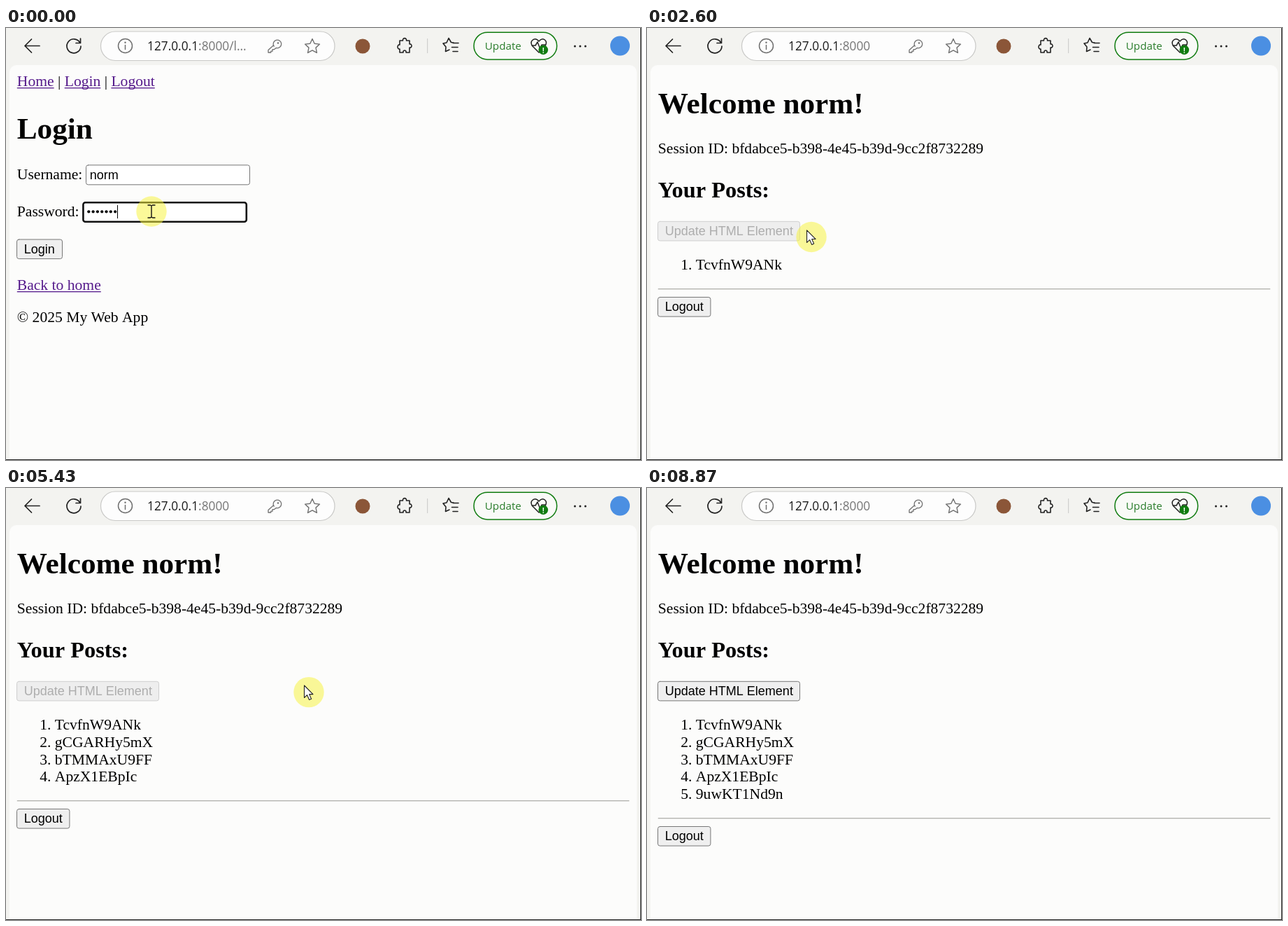
An HTML page with a canvas that plays this animation: 908 px wide and 617 px high, repeating every 8.9 s.

```html
<!DOCTYPE html>
<html lang="en">
<head>
<meta charset="utf-8">
<title>Login session demo</title>
<style>
html, body { margin: 0; width: 100%; height: 100%; overflow: hidden; background: #f3f3f0; }
canvas { display: block; width: 908px; height: 617px; }
</style>
</head>
<body>
<canvas id="stage" width="908" height="617"></canvas>
<script>
const W = 908, H = 617, LOOP = 8900;
const stage = document.getElementById('stage').getContext('2d');
const layer = document.createElement('canvas');
layer.width = W;
layer.height = H;
const off = layer.getContext('2d');
let c = stage;

const SERIF = '"Liberation Serif", "Times New Roman", serif';
const SANS = '"Liberation Sans", Arial, sans-serif';
const UI = '"Open Sans", "Noto Sans", sans-serif';
const BODY = '21.6px ' + SERIF;
const CONTROL = '18px ' + SANS;
const USER = 'norm';
const POSTS = ['TcvfnW9ANk', 'gCGARHy5mX', 'bTMMAxU9FF', 'ApzX1EBpIc', '9uwKT1Nd9n'];

// Moments of the story, in ms
const NAV = 340, CLICK = 2190, DISABLE = 2270, FIRST_POST = 2290, POST_GAP = 985, ENABLE = 7230;
const FADE = 165;

// Cursor stops: time, x, y of the tip
const PATH = [
  [1790, 208, 262], [2040, 196, 290], [2540, 196, 290], [2800, 426, 282],
  [6160, 426, 282], [6295, 406, 500], [7060, 406, 500], [7300, 422, 645]
];

const clamp = v => Math.max(0, Math.min(1, v));
const ease = v => v * v * (3 - 2 * v);

function text(str, x, y, font = BODY, color = '#000') {
  c.font = font;
  c.fillStyle = color;
  c.fillText(str, x, y);
  return c.measureText(str).width;
}

function box(x, y, w, h, r, fill, stroke, lw = 1) {
  c.beginPath();
  c.roundRect(x, y, w, h, r);
  if (fill) { c.fillStyle = fill; c.fill(); }
  if (stroke) { c.strokeStyle = stroke; c.lineWidth = lw; c.stroke(); }
}

function disc(x, y, r, fill) {
  c.beginPath();
  c.arc(x, y, r, 0, 7);
  c.fillStyle = fill;
  c.fill();
}

function line(path, color, lw) {
  c.strokeStyle = color;
  c.lineWidth = lw;
  c.lineJoin = c.lineCap = 'round';
  c.stroke(new Path2D(path));
}

function link(str, x, y) {
  const w = text(str, x, y, BODY, '#551a8b');
  c.fillRect(x, y + 2, w, 1.3);
  return x + w;
}

function button(label, y, w, mode) {
  const off = mode === 'disabled', hover = mode === 'hover';
  box(15.5, y + .5, w, 27.6, 3,
    hover ? '#e4e4e4' : off ? '#eeeeee' : '#efefef',
    off ? '#cfcfcf' : hover ? '#5a5a5a' : '#777');
  text(label, 25.8, y + 20, CONTROL, off ? '#adadad' : '#000');
}

function star(x, y, r) {
  let d = '';
  for (let i = 0; i < 10; i++) {
    const a = i * Math.PI / 5 - Math.PI / 2, k = i % 2 ? r * .48 : r;
    d += (i ? 'L' : 'M') + (x + k * Math.cos(a)) + ' ' + (y + k * Math.sin(a));
  }
  return d + 'Z';
}

function toolbar(path) {
  const ink = '#222', grey = '#707070', green = '#107c10';
  line('M48 25.5H27M36.5 16L27 25.5L36.5 35', ink, 1.7);
  line('M105.5 20.5A10 10 0 1 0 107 26M106.5 15V21.5H100', ink, 1.7);

  box(135.5, 5, 334.5, 41.5, 20.7, '#fdfdfd', '#c9c9c7', 1.2);
  line('M180.5 25.5A10 10 0 1 1 160.5 25.5A10 10 0 1 1 180.5 25.5M170.5 24.5V30.5', grey, 1.5);
  disc(170.5, 20.8, 1.2, grey);
  const w = text('127.0.0.1', 202, 32, '17.3px ' + UI, '#1b1b1b');
  text(path, 202 + w, 32, '17.3px ' + UI, '#767676');
  line('M383.2 26.2A5.8 5.8 0 1 1 386.2 28.4L383.6 30.6H381V33.2H378.8V35H375V31.6L382.8 24.6', grey, 1.3);
  disc(389, 21.5, 1.2, grey);
  line(star(438, 26.5, 11), grey, 1.4);

  disc(510, 26, 10.5, '#8b5638');
  line('M563 18H567.5C566.5 13.5 573.5 13.5 572.5 18H577V23C581 22 581 29 577 28V35H572C573 31 567 31 568 35H563V30C559 31 559 23 563 24Z', ink, 1.6);
  c.fillStyle = '#cfcfcd';
  c.fillRect(602, 15, 1.2, 21);
  line('M640 21L636.5 20.5L633 14.5L630 21L625 22L629 27L628.5 33.5L634 31M639 21.5H647M637.5 27.5H646M639 33.5H646', ink, 1.6);

  box(669, 6.2, 118.7, 38.8, 19.4, '#f9faf7', green, 1.5);
  text('Update', 684.8, 31, '15.2px ' + UI, '#2a7d2c');
  line('M762 19C757 12.5 748.5 17 752 25L762 35L771.5 25C775 17 767 12.5 762 19M752 25H757L760 20L763.5 29L766 24H771', ink, 1.5);
  disc(768.3, 31.3, 6.8, green);
  text('!', 766.5, 35.5, 'bold 11px ' + SANS, '#fff');
  for (const x of [813.5, 821, 828.5]) disc(x, 26, 1.5, ink);
  disc(878, 25.5, 14, '#4b8fe2');
}

function shell(path) {
  c.fillStyle = '#f3f3f0';
  c.fillRect(0, 0, W, H);
  toolbar(path);
  box(5, 53, 897, 575, 10, '#fcfcfb');
  c.fillStyle = '#222';
  c.fillRect(907, 0, 1, H);
  c.fillRect(0, 616, W, 1);
}

function loginPage() {
  shell(':8000/l...');
  let x = link('Home', 15.8, 83);
  x += text(' | ', x, 83);
  x = link('Login', x, 83);
  x += text(' | ', x, 83);
  link('Logout', x, 83);
  text('Login', 15.8, 158, 'bold 43.2px ' + SERIF);
  text('Username:', 15.8, 216);
  box(114.5, 195.8, 234, 28, 3, '#fff', '#777');
  text(USER, 119.8, 216, CONTROL);
  text('Password:', 15.8, 269);
  box(110.4, 249.2, 233.4, 27.6, 3, '#fff', '#101010', 2.6);
  for (let i = 0; i < 7; i++) disc(118.3 + 6.3 * i, 262.3, 2.1, '#000');
  c.fillStyle = '#000';
  c.fillRect(159, 253, 1, 19);
  button('Login', 301.5, 65);
  link('Back to home', 15.8, 374);
  text('© 2025 My Web App', 15.8, 420);
}

function homePage(count, mode) {
  shell(':8000');
  text('Welcome ' + USER + '!', 15.8, 122, 'bold 43.2px ' + SERIF);
  text('Session ID: bfdabce5-b398-4e45-b39d-9cc2f8732289', 15.8, 179);
  text('Your Posts:', 15.8, 242, 'bold 32.4px ' + SERIF);
  button('Update HTML Element', 275.8, 203, mode);
  for (let i = 0; i < count; i++) {
    const y = Math.round(345 + 24.75 * i);
    text(i + 1 + '.', 48.2, y);
    text(POSTS[i], 69.8, y);
  }
  const drop = count ? 46.5 + 24.75 * (count - 1) : 0;
  c.fillStyle = '#b4b4b0';
  c.fillRect(15.8, Math.round(325.2 + drop), 875.4, 1.4);
  button('Logout', Math.round(337.5 + drop), 75.4);
}

// Every page state with the time at which it fades in
const scenes = [
  [-FADE, loginPage],
  [NAV, () => homePage(0)],
  [1900, () => homePage(0, 'hover')],
  ...POSTS.map((_, i) => [FIRST_POST + POST_GAP * i, () => homePage(i + 1, 'disabled')]),
  [ENABLE, () => homePage(POSTS.length)]
];

function pointer(t) {
  let i = 0;
  while (i < PATH.length - 1 && t >= PATH[i + 1][0]) i++;
  const a = PATH[i], b = PATH[Math.min(i + 1, PATH.length - 1)];
  const k = b === a ? 0 : ease(clamp((t - a[0]) / (b[0] - a[0])));
  return [a[1] + (b[1] - a[1]) * k, a[2] + (b[2] - a[2]) * k];
}

function cursor(t) {
  const [x, y] = pointer(t);
  const beam = t < NAV + FADE / 2;
  disc(beam ? x : x + 7, beam ? y : y + 9.6, 21.7, 'rgba(248,244,60,.52)');
  if (t >= CLICK && t < CLICK + 130) {
    c.beginPath();
    c.arc(x, y, 7, 0, 7);
    c.strokeStyle = 'rgba(205,155,20,.8)';
    c.lineWidth = 3;
    c.stroke();
  }
  c.save();
  c.translate(x, y);
  if (beam) {
    line('M-5 -9H-1.5L0 -8L1.5 -9H5M0 -8V8M-5 9H-1.5L0 8L1.5 9H5', '#111', 1.4);
  } else {
    const arrow = new Path2D('M.5 0V17.5L4.6 13.7L7.6 20.5L10.6 19.2L7.7 12.6H13Z');
    c.fillStyle = '#fff';
    c.fill(arrow);
    c.strokeStyle = '#222';
    c.lineWidth = 1.1;
    c.stroke(arrow);
  }
  c.restore();
}

function draw(t) {
  let i = scenes.length - 1;
  while (scenes[i][0] > t) i--;
  const k = clamp((t - scenes[i][0]) / FADE);
  c = stage;
  if (k < 1) {
    scenes[i - 1][1]();
    c = off;
    scenes[i][1]();
    c = stage;
    c.globalAlpha = k;
    c.drawImage(layer, 0, 0);
    c.globalAlpha = 1;
  } else {
    scenes[i][1]();
  }
  if (t >= DISABLE && t < FIRST_POST) button('Update HTML Element', 275.8, 203, 'disabled');
  cursor(t);
}

const start = performance.now();
function tick() {
  draw((performance.now() - start) % LOOP);
  requestAnimationFrame(tick);
}
tick();
</script>
</body>
</html>
```
